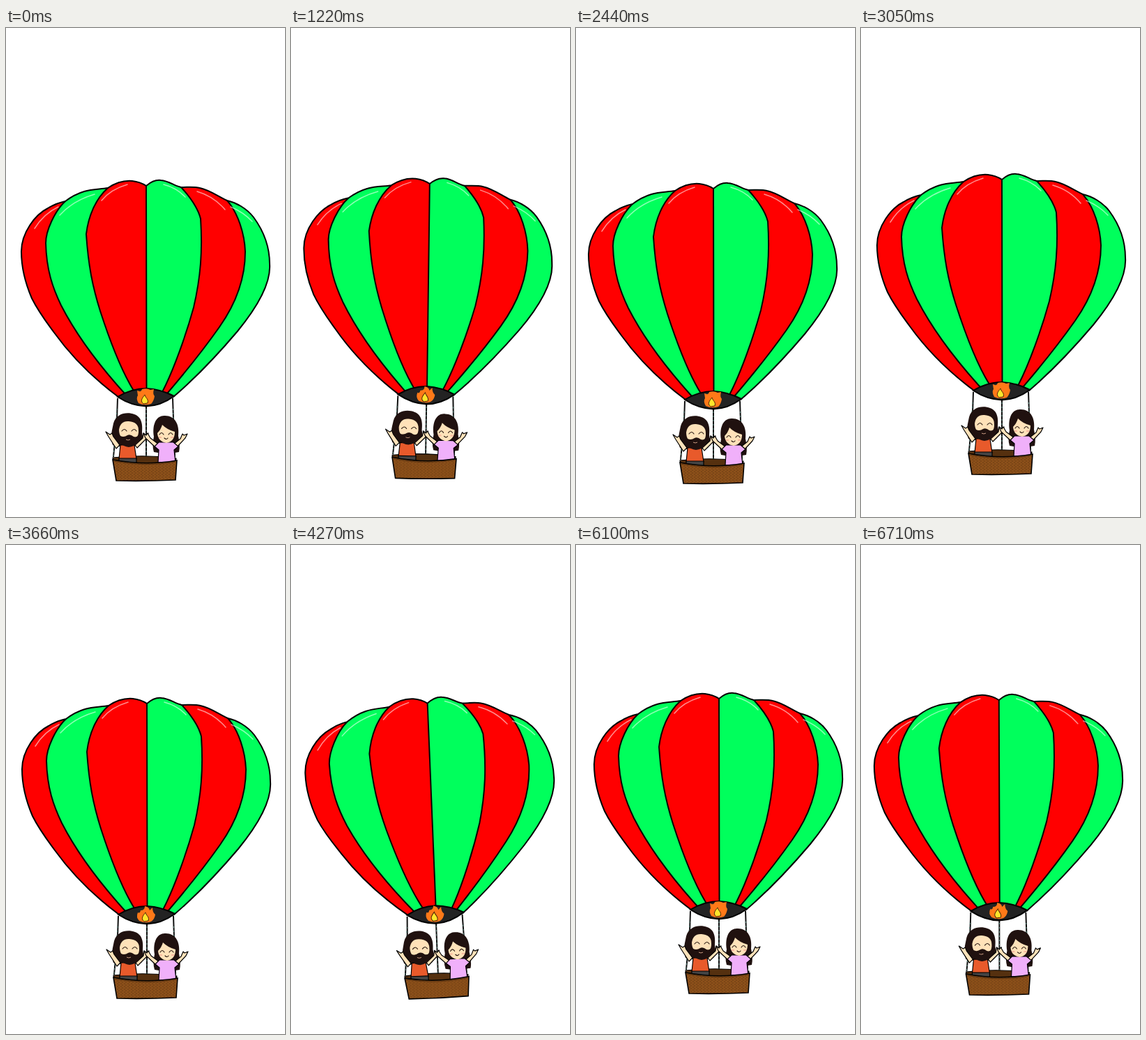
Write an HTML page that moves like this. It is 400x700 px and loops after 7.32 s.

```html
<!DOCTYPE html>
<html lang="en">
<head>
<meta charset="utf-8">
<title>Hot air balloon</title>
<style>
html, body { margin: 0; width: 100%; height: 100%; overflow: hidden; background: #fff; }
svg { display: block; width: 100%; height: 100%; }
.line { fill: none; stroke: #000; stroke-width: 2; }
.ink { stroke: #000; stroke-width: 1.2; stroke-linejoin: round; }
.thin { fill: none; stroke: #21120d; stroke-width: 1.1; stroke-linecap: round; }
.hair { fill: #20110f; }
.skin { fill: #ffe2b9; }
</style>
</head>
<body>
<svg viewBox="0 0 400 700">
  <defs>
    <clipPath id="clip"><path id="hull" d="M161 528C126 502 95 472 69 436C58 421 47 407 37 387C28 366 22 345 22 320C22 293 42 267 60 258C68 253 76 250 85 248C93 242 102 237 112 234C124 230 135 231 146 229C158 221 170 218 181 219C190 220 195 222 201 226C208 220 214 217 222 218C234 219 241 226 251 228C262 228 270 227 278 229C292 232 304 241 317 247C330 250 345 258 355 271C369 290 378 312 378 338C380 366 360 400 332 434C304 467 274 499 240 528Q201 544 161 528Z"/></clipPath>
    <pattern id="weave" width="5" height="4" patternUnits="userSpaceOnUse">
      <rect width="5" height="4" fill="#8c501a"/>
      <path d="M0 1h2M3 3h2" stroke="#6b3b12"/>
    </pattern>
  </defs>
  <g id="balloon">
    <g clip-path="url(#clip)" id="panels"><rect width="400" height="700" fill="#00ff5c"/></g>
    <use href="#hull" class="line"/>
    <path fill="none" stroke="#fff" stroke-opacity=".55" stroke-width="1.5" stroke-linecap="round" d="M41 287Q54 266 75 256M77 268Q96 247 127 238M137 247Q150 231 174 224M226 224Q245 229 257 242M274 234Q298 241 314 260M322 256Q341 264 353 277"/>

    <g fill="none" stroke-width="2">
      <path stroke="#111" d="M160 530L159 560L154 614M201 541V614M239 530L240 560L242 614"/>
      <path stroke="#52877c" stroke-width="1" stroke-dasharray="2 4" d="M159 545L154 614M201 545V614M239.5 545L242 614"/>
    </g>
    <path class="line" style="fill:#232323" d="M160 528Q180 516 201 516Q222 517 241 527Q222 541 201 541.5Q180 541 160 528Z"/>
    <path id="flame" fill="#ff7918"/>
    <path fill="#ffe52b" stroke="#4a2208" d="M197 538C192 534 195 530 199 525C200 530 205 531 203 537Z"/>

    <path class="ink" fill="#55300f" d="M153 615Q200 610 244 616L243 624H155Z"/>

    <!-- man -->
    <path class="hair" d="M153 597C149 585 152 576 154 566C158 551 174 549 184 553C195 557 196 568 195 579Q198 590 193 597Q173 602 153 597Z"/>
    <path class="skin ink" d="M163 597L154 585L152 580L149 582L143 578L147 585L158 602ZM185 597L196 587L197 580L200 583L204 580L202 587L188 601Z"/>
    <path class="ink" fill="#e85a2b" d="M164 597H184L187 617H162Z"/>
    <path class="ink" fill="#444" d="M162 616H187V623H162Z"/>
    <path class="skin" d="M162 575Q164 562 176 563Q190 564 190 576Q191 589 176 592Q162 589 162 575Z"/>
    <path class="hair" d="M160 581Q167 588 174 583Q178 581 183 585Q188 587 193 580Q193 598 176 600Q160 598 160 581Z"/>
    <path d="M172 589Q175 591 178 589" fill="none" stroke="#c89a80"/>
    <path class="thin" d="M166 577Q170 572 173 577M180 577Q184 572 187 577"/>

    <!-- woman -->
    <path class="hair" d="M212 607Q209 598 212 585C209 565 217 554 228 555C242 555 249 567 247 584Q250 598 248 607Q230 611 212 607Z"/>
    <path class="skin ink" d="M219 596L207 587L203 580L201 583L197 580L200 587L215 601ZM240 596L250 588L253 581L255 583L260 581L257 587L244 601Z"/>
    <path class="ink" fill="#f0b0fa" d="M219 593H240L247 599L241 604L243 622H218L219 604L213 599Z"/>
    <path class="skin" d="M217 580Q222 575 224 568Q231 575 242 578Q242 592 230 594Q218 592 217 580Z"/>
    <path class="thin" d="M220 582Q223 577 226 582M233 582Q236 577 239 582M227 587Q230 590 232 587"/>
    <path d="M219 586h4M236 586h4" stroke="#f9b9a0" stroke-width="2"/>

    <path class="line" style="fill:url(#weave);stroke-width:1.6" d="M153 618Q199 627 245 619L243 647Q200 649 158 648Z"/>
    <path d="M154 620Q199 629 244 621" fill="none" stroke="#5c3310"/>
  </g>
</svg>
<script>
const STEP = 610;
const $ = id => document.getElementById(id);

// Each panel covers everything left of its seam, painted right to left.
const seams = [
  ['317 247C333 265 342 295 343 320C343 360 330 394 306 428C282 462 256 494 232 522', 'red'],
  ['251 228C262 240 275 257 279 273C282 320 279 357 269 400C258 440 240 490 225 519', '#00ff5c'],
  ['201 226L201.5 517', 'red'],
  ['146 229C128 245 118 270 115 295C118 340 124 370 135 405C148 445 165 490 183 519', '#00ff5c'],
  ['85 248C70 262 57 290 57 308C58 347 67 372 79 397C98 434 131 480 170 523', 'red']
];
for (const [seam, color] of seams) {
  const panel = document.createElementNS('http://www.w3.org/2000/svg', 'path');
  panel.setAttribute('d', `M${seam}V600H-9V190H${parseFloat(seam)}Z`);
  panel.setAttribute('class', 'line');
  panel.style.fill = color;
  $('panels').append(panel);
}

// Drift: x, y, tilt in degrees
const poses = [
  [0, 0, 0], [2, -5, 0], [-4, -3, .85], [0, -8, 0],
  [-4, 4, 0], [1, -9, 0], [1, 1, 0], [-.5, .5, -2.25],
  [1, 1, 0], [-1.3, 8, -.4], [4, -6, 0], [-3, -4, -.1]
];
const flames = [
  'M190 537Q186 530 189 526L188 519Q194 522 195 517Q202 515 207 518L212 517Q210 524 213 527Q212 534 208 538Q198 541 190 537Z',
  'M190 537Q185 532 188 525Q191 527 192 522Q198 522 198 516Q204 517 205 522L209 518Q209 525 213 528Q212 535 207 538Q199 541 190 537Z'
];

function draw() {
  const step = Math.floor(performance.now() / STEP) % poses.length;
  const [x, y, tilt] = poses[step];
  const beat = step % 5;
  $('balloon').setAttribute('transform', `translate(${x} ${y}) rotate(${tilt} 200 350)`);
  $('flame').setAttribute('d', flames[beat === 1 || beat === 2 ? 1 : 0]);
  requestAnimationFrame(draw);
}
draw();
</script>
</body>
</html>
```
